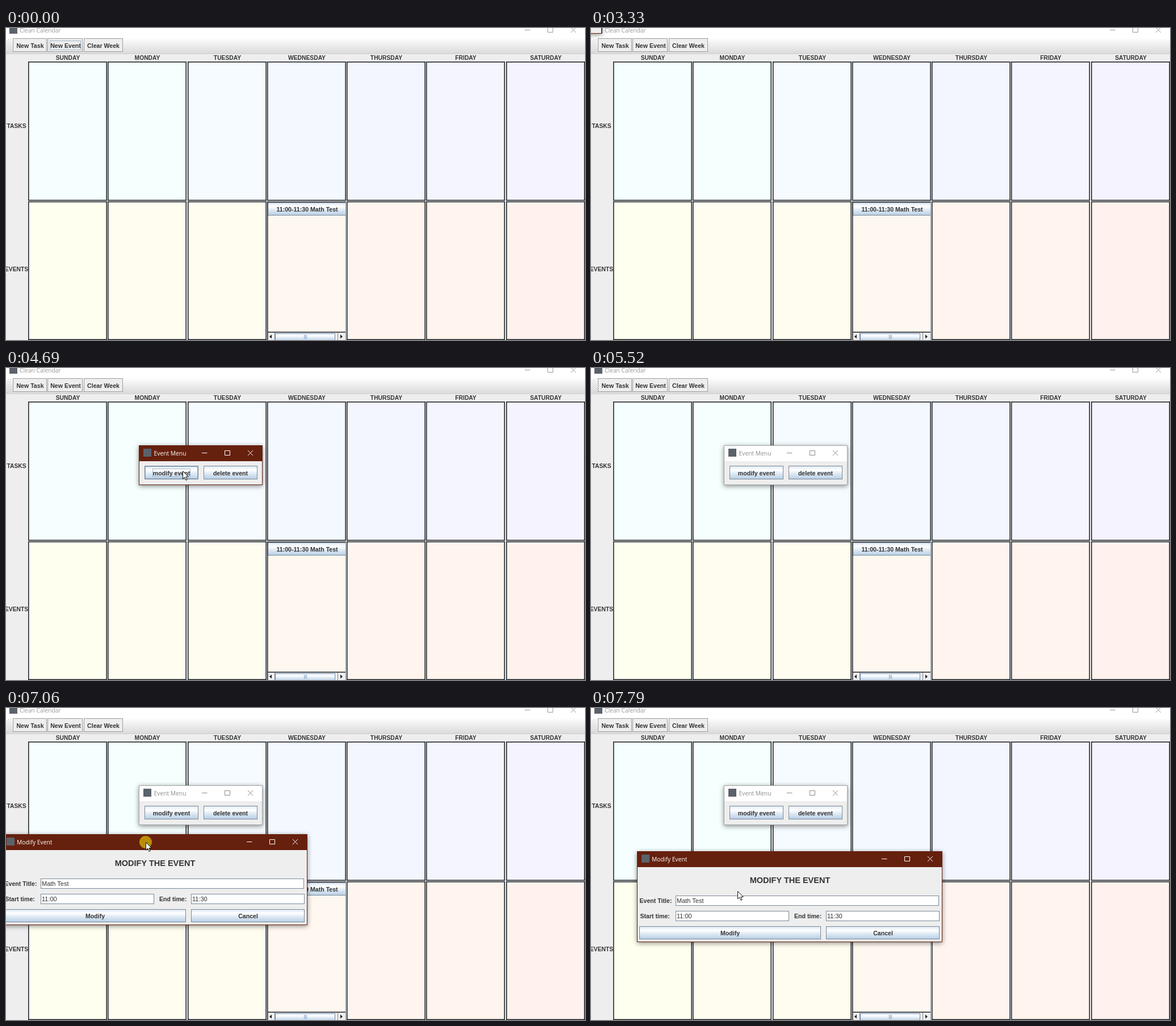
Animation of 1020x549 px, one loop 8000 ms. Source, as an HTML page:

```html
<!DOCTYPE html>
<html lang="en">
<head>
<meta charset="utf-8">
<title>Calendar</title>
<style>
  html, body { margin: 0; width: 100%; height: 100%; overflow: hidden; background: #eee; }
  svg { display: block; width: 1020px; height: 549px; }
  text { font: bold 10.6px "Liberation Sans", Arial, sans-serif; fill: #333; }
  .caps text { font-size: 10.3px; }
  .mid { text-anchor: middle; }
  .val { font-weight: normal; font-size: 11px; }
  .head { font-size: 14.5px; }
  .bar text { font: 10.3px "Open Sans", "Noto Sans", sans-serif; fill: currentColor; }
  .bar use { stroke: currentColor; fill: none; }
  .bar { color: #fff; }
  .bar .fill, .frame { fill: #66200e; }
  .icon { fill: #5b626c; }
  .tool { fill: #eee; stroke: #9a9da0; }
  .btn { fill: url(#ocean); stroke: #7a8a99; }
  .field { fill: #fff; stroke: #7a8a99; }
  .ring { fill: none; stroke: #a3b8cc; }
  .hover { fill: none; stroke: #8fb0d0; }
  .press { fill: #b8cfe5; }
  .cell { stroke: #23282c; stroke-width: 1.6; }
  .frame { filter: drop-shadow(0 2px 4px rgba(0, 0, 0, .45)); }

  /* one 8 s loop; every change is a hard step unless a segment says otherwise */
  .a { animation: 8s step-end infinite; }
  #mainBar { animation-name: main-color; }
  #mainBar .fill { animation-name: main-fill; }
  #menuBar { animation-name: menu-color; }
  #menuBar .fill { animation-name: menu-fill; }
  #menu .frame { animation-name: menu-frame; }
  #newRing { animation-name: new-ring; }
  #mathHover { animation-name: math-hover; }
  #mathPress { animation-name: math-press; }
  #mathRing { animation-name: math-ring; }
  #modHover { animation-name: mod-hover; }
  #modPress { animation-name: mod-press; }
  #modRing { animation-name: mod-ring; }
  #menu { animation-name: menu-move; }
  #dialog { animation-name: dialog-move; }
  #cursor { animation-name: cursor-move; }
  #glow { animation-name: glow; }

  @keyframes main-color { 0%, 18.25%, to { color: #999 } 16.625% { color: #fff } }
  @keyframes main-fill { 0%, 18.25%, to { fill: #fff } 16.625% { fill: #66200e } }
  @keyframes menu-color { 0% { color: #fff } 62.875%, to { color: #8c8c8c } }
  @keyframes menu-fill { 0% { fill: #66200e } 62.875%, to { fill: #fff } }
  @keyframes menu-frame { 0% { fill: #66200e } 62.875%, to { fill: #a4a4a4 } }
  @keyframes new-ring { 0% { opacity: 1 } 16.625%, to { opacity: 0 } }
  @keyframes math-hover { 0%, 23.5%, to { opacity: 0 } 15.75% { opacity: 1 } }
  @keyframes math-press { 0%, 17.5%, to { opacity: 0 } 16.625% { opacity: 1 } }
  @keyframes math-ring { 0%, 18.25%, to { opacity: 0 } 16.625% { opacity: 1 } }
  @keyframes mod-hover { 0%, 67.25%, to { opacity: 0 } 52.625% { opacity: 1 } }
  @keyframes mod-press { 0%, 62%, to { opacity: 0 } 59.875% { opacity: 1 } }
  @keyframes mod-ring { 0% { opacity: 1 } 62.875%, to { opacity: 0 } }
  @keyframes glow {
    0%, 18.25%, 48.625%, 62%, 95.25%, to { opacity: 0 }
    16.625%, 41.625%, 59.875%, 84.875% { opacity: 1 }
  }
  @keyframes menu-move {
    0% { transform: translate(-499px, -199px) }
    41.625% { transform: translate(-199px, -60px) }
    42.75% { transform: translate(-40px, 20px) }
    43.625% { transform: translate(90px, 75px) }
    44.375% { transform: translate(170px, 110px) }
    45.25% { transform: translate(220px, 130px) }
    46.125%, to { transform: translate(234px, 136px) }
  }
  @keyframes dialog-move {
    0% { transform: translate(-699px, -299px) }
    84.875% { transform: translate(-440px, -80px) }
    85.625% { transform: translate(-330px, 10px) }
    86.375% { transform: translate(-214px, 91px) }
    87.5% { transform: translate(-100px, 162px) }
    88.25% { transform: translate(-7px, 222px) }
    89% { transform: translate(30px, 236px); animation-timing-function: steps(5) }
    93.375%, to { transform: translate(81px, 252px) }
  }
  @keyframes cursor-move {
    0%, 27.5%, 69% { transform: translate(-99px, -99px) }
    5.875% { transform: translate(896px, 517px); animation-timing-function: steps(6) }
    10.8125% { transform: translate(640px, 400px); animation-timing-function: steps(6) }
    15.75% { transform: translate(515px, 326px) }
    23.5% { transform: translate(470px, 300px); animation-timing-function: steps(3) }
    26.5% { transform: translate(77px, 96px) }
    42.75% { transform: translate(-19px, 34px) }
    43.625% { transform: translate(111px, 89px) }
    44.375% { transform: translate(191px, 124px) }
    45.25% { transform: translate(241px, 144px) }
    46.125% { transform: translate(255px, 150px) }
    48.625% { transform: translate(258px, 152px); animation-timing-function: steps(6) }
    54.625% { transform: translate(313px, 178px) }
    56.625% { transform: translate(311px, 181px) }
    67.25% { transform: translate(265px, 150px) }
    68.125% { transform: translate(208px, 123px) }
    85.625% { transform: translate(-20px, 60px) }
    86.375% { transform: translate(74px, 143px) }
    87.5% { transform: translate(180px, 198px) }
    88.25% { transform: translate(246px, 236px) }
    89% { transform: translate(275px, 247px); animation-timing-function: steps(5) }
    93.375% { transform: translate(319px, 260px) }
    95.25% { transform: translate(297px, 262px) }
    96% { transform: translate(198px, 300px) }
    96.75% { transform: translate(235px, 315px) }
    97.375%, to { transform: translate(258px, 322px) }
  }
</style>
</head>
<body>
<svg viewBox="0 0 1020 549">
  <defs>
    <linearGradient id="ocean" x2="0" y2="1">
      <stop stop-color="#dde8f3"/><stop offset=".3" stop-color="#fff"/>
      <stop offset=".6" stop-color="#dde8f3"/><stop offset="1" stop-color="#b8cfe5"/>
    </linearGradient>
    <linearGradient id="strip" x2="0" y2="1">
      <stop stop-color="#fff"/><stop offset="1" stop-color="#dadada"/>
    </linearGradient>
    <pattern id="bumps" width="4" height="4" patternUnits="userSpaceOnUse">
      <path d="M0 0h1v1h-1zM2 2h1v1h-1z" fill="#aaa"/>
      <path d="M1 1h1v1h-1zM3 3h1v1h-1z" fill="#fff"/>
    </pattern>
    <clipPath id="wed"><path d="M461 306h137v243h-137z"/></clipPath>
    <path id="controls" d="M-107 13.5h9.5M-66.5 9.5h9v8h-9zM-26 9l9 9m0-9l-9 9"/>
  </defs>

  <rect width="1020" height="549" fill="#eee"/>
  <g id="mainBar" class="bar a">
    <rect class="fill a" width="1020" height="17"/>
    <rect class="icon" x="6" y="-4" width="14" height="14"/>
    <text x="24" y="7.5">Clean Calendar</text>
    <use href="#controls" x="1021" y="-10"/>
  </g>
  <rect y="17" width="1020" height="28" fill="url(#strip)"/>
  <path d="M0 45.5h1020" stroke="#d2d2d2"/>
  <rect x="1" y="19" width="8" height="24" fill="url(#bumps)"/>
  <rect class="tool" x="12.5" y="18.5" width="59" height="23"/>
  <rect class="tool" x="73.5" y="18.5" width="61" height="23"/>
  <rect class="tool" x="137.5" y="18.5" width="68" height="23"/>
  <rect id="newRing" class="ring a" x="77.5" y="22.5" width="54" height="16"/>
  <g class="mid">
    <text x="42.5" y="35">New Task</text>
    <text x="105" y="35">New Event</text>
    <text x="171.5" y="35">Clear Week</text>
  </g>
  <g id="grid" class="caps mid">
    <text x="18.5" y="176">TASKS</text>
    <text x="18.5" y="428">EVENTS</text>
  </g>

  <!-- Wednesday's scrolling event list -->
  <rect x="460" y="305" width="139" height="244" fill="#fff8f0"/>
  <g clip-path="url(#wed)">
    <rect class="btn" x="461.5" y="307.5" width="150" height="22"/>
    <rect id="mathPress" class="press a" x="462" y="308" width="140" height="21"/>
    <rect id="mathHover" class="hover a" x="462.5" y="308.5" width="148" height="20"/>
    <rect id="mathRing" class="ring a" x="474.5" y="311.5" width="116" height="14"/>
    <text x="476.5" y="323">11:00-11:30 Math Test</text>
    <rect x="461" y="536" width="138" height="13" fill="#eee"/>
    <path d="M461 535.3h138" stroke="#222" stroke-width="1.6"/>
    <path d="M473.5 536v13M584.5 536v13" stroke="#7a8a99"/>
    <path d="M468 539.5v7l-4-3.500zM589 539.5v7l4-3.500z" fill="#222"/>
    <rect x="474.5" y="537.5" width="105" height="13" fill="url(#ocean)" stroke="#6f8fb8"/>
    <path d="M525.500 540v7M527.5 540v7M529.5 540v7" stroke="#8aa6c8"/>
  </g>
  <path d="M460.800 549V306H598" fill="none" stroke="#23282c" stroke-width="1.6"/>
  <path d="M598.500 305v244" stroke="#7a8a99"/>

  <g id="menu" class="a">
    <rect class="frame a" width="218" height="70"/>
    <g id="menuBar" class="bar a">
      <rect class="fill a" x="1" y="1" width="216" height="27"/>
      <rect class="icon" x="8" y="6" width="14" height="14"/>
      <text x="26.500" y="17.500">Event Menu</text>
      <use href="#controls" x="218"/>
    </g>
    <rect x="1" y="28" width="216" height="41" fill="#eee"/>
    <rect class="btn" x="10.500" y="36.500" width="94" height="23"/>
    <rect class="btn" x="114.500" y="36.500" width="94" height="23"/>
    <rect id="modPress" class="press a" x="11" y="37" width="93" height="22"/>
    <rect id="modHover" class="hover a" x="11.500" y="37.500" width="92" height="21"/>
    <rect id="modRing" class="ring a" x="24.500" y="41.500" width="66" height="14"/>
    <text class="mid" x="57.500" y="52.500">modify event</text>
    <text class="mid" x="161.500" y="52.500">delete event</text>
  </g>

  <g id="dialog" class="a">
    <rect class="frame" width="538" height="160"/>
    <g class="bar">
      <rect class="icon" x="8" y="6" width="14" height="14"/>
      <text x="26" y="17.500">Modify Event</text>
      <use href="#controls" x="538"/>
    </g>
    <rect x="1" y="28" width="536" height="131" fill="#eee"/>
    <text class="head mid" x="269.500" y="56">MODIFY THE EVENT</text>
    <text x="4.500" y="91">Event Title:</text>
    <text x="5.500" y="118">Start time:</text>
    <text x="277" y="118">End time:</text>
    <rect class="field" x="68.500" y="78.500" width="463" height="17"/>
    <rect class="field" x="68.500" y="105.500" width="199" height="17"/>
    <rect class="field" x="333.500" y="105.500" width="199" height="17"/>
    <text class="val" x="70" y="91">Math Test</text>
    <text class="val" x="70" y="118">11:00</text>
    <text class="val" x="335" y="118">11:30</text>
    <rect class="btn" x="4.500" y="132.500" width="319" height="22"/>
    <rect class="btn" x="333.500" y="132.500" width="199" height="22"/>
    <text class="mid" x="164" y="147.500">Modify</text>
    <text class="mid" x="433.500" y="147.500">Cancel</text>
  </g>

  <g id="cursor" class="a">
    <circle id="glow" class="a" r="11" fill="#fae400" fill-opacity=".56"/>
    <path d="M.5.5V14L3.700 11 6 16.400 8.200 15.500 5.900 10.300H10.300Z" fill="#fff" stroke="#111"/>
  </g>
</svg>
<script>
  const days = ['SUN', 'MON', 'TUES', 'WEDNES', 'THURS', 'FRI', 'SATUR'];
  const cool = ['#f5ffff', '#f5fffe', '#f5fbff', '#f3f9ff', '#f3f6ff', '#f5f5ff', '#f5f3ff'];
  const warm = ['#fffff0', '#fffdf0', '#fffcf0', '#fff8f0', '#fff5ee', '#fff4ee', '#fff2ee'];
  const cell = (x, y, h, fill) =>
    `<rect class="cell" x="${x + .8}" y="${y + .8}" width="137.4" height="${h - 1.6}" fill="${fill}"/>`;

  document.getElementById('grid').innerHTML += days.map((day, i) => {
    const x = Math.round(39 + 140.25 * i);
    return `<text x="${x + 70}" y="56">${day}DAY</text>` +
      cell(x, 59, 245, cool[i]) + cell(x, 305, 244, warm[i]);
  }).join('');
</script>
</body>
</html>
```
